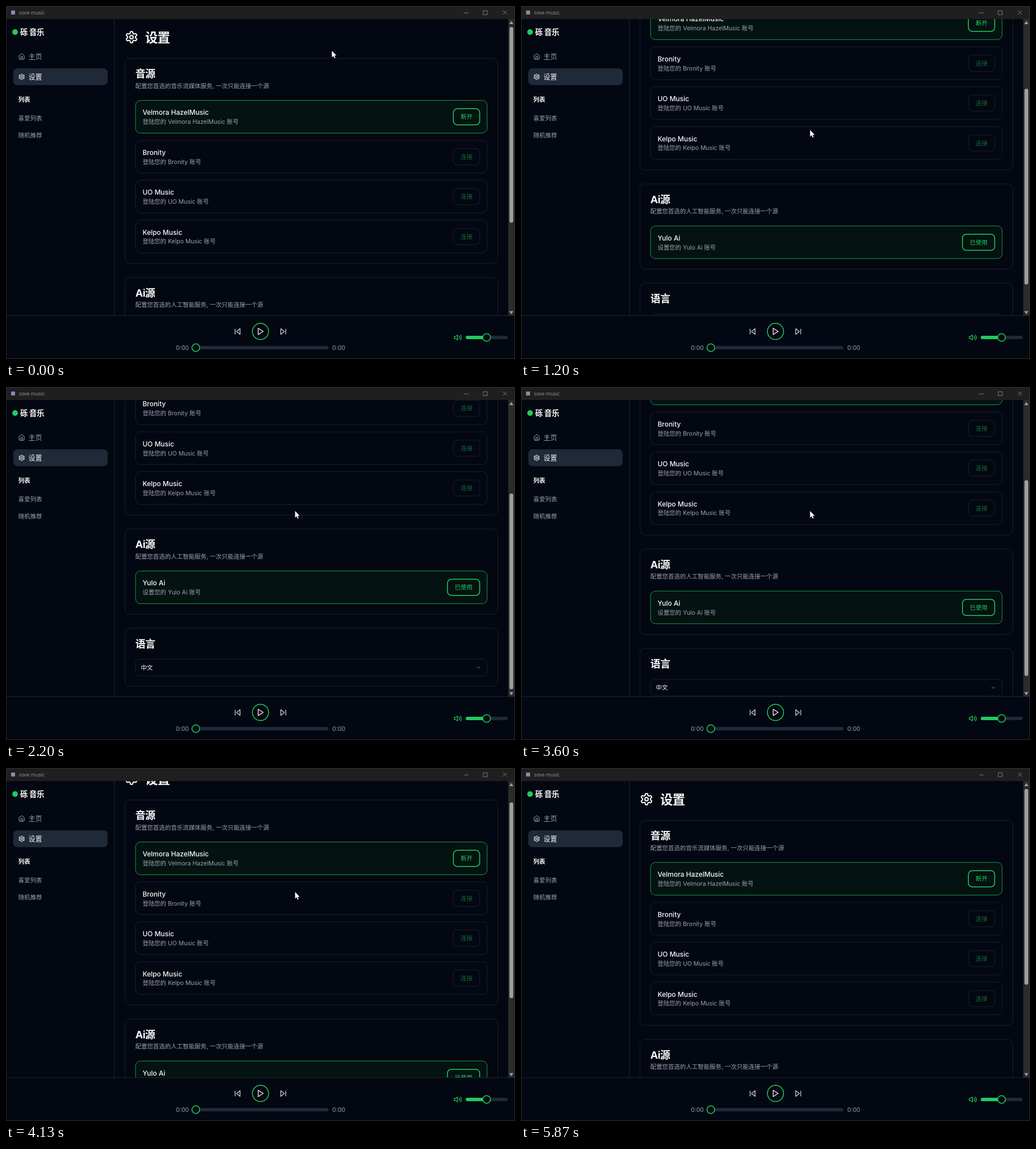
Recreate the animation shown at these times as an HTML page. Size 899 px wide and 623 px high, loop 7.87 s.

```html
<!DOCTYPE html>
<html lang="zh-CN">
<head>
<meta charset="utf-8">
<title>sove music</title>
<style>
  html, body { margin: 0; width: 100%; height: 100%; overflow: hidden; background: #030711; }
  svg { display: block; width: 100%; height: 100%; }
  text { font-family: Inter, "Noto Sans CJK SC", "Noto Sans CJK", sans-serif; white-space: pre; }
  .bar { font-family: "Open Sans", "Noto Sans", sans-serif; }
  .tight { letter-spacing: -0.025em; }
</style>
</head>
<body>
<svg id="stage" viewBox="0 0 899 623"></svg>
<script>
const LOOP = 7870;
const ZOOM = 0.749; // the page is laid out in its own units and shown at this scale
const MAX_SCROLL = 228.4;
const BG = '#030711', LINE = '#1f2937', MUTED = '#9ca3af', WHITE = '#f9fafb', GREEN = '#1fcb5d';

// Markup helpers
const text = (x, y, s, size, fill, weight = 400, extra = '') =>
  `<text x="${x}" y="${y}" font-size="${size}" fill="${fill}" font-weight="${weight}" ${extra}>${s}</text>`;
const box = (x, y, w, h, rx, fill, stroke = 'none', sw = 1) =>
  `<rect x="${x}" y="${y}" width="${w}" height="${h}" rx="${rx}" fill="${fill}" stroke="${stroke}" stroke-width="${sw}"/>`;
// A box whose border lies inside its outer size
const frame = (x, y, w, h, r, fill, stroke, sw = 1) =>
  box(x + sw / 2, y + sw / 2, w - sw, h - sw, r - sw / 2, fill, stroke, sw);
const path = (d, stroke, sw = 1, fill = 'none') =>
  `<path d="${d}" stroke="${stroke}" stroke-width="${sw}" fill="${fill}"/>`;
const ring = (x, y, r) =>
  `<circle cx="${x}" cy="${y}" r="${r}" fill="${BG}" stroke="${GREEN}" stroke-width="1.5"/>`;
const icon = (x, y, scale, color, body) =>
  `<g transform="translate(${x} ${y}) scale(${scale})" fill="none" stroke="${color}" stroke-width="2" stroke-linecap="round" stroke-linejoin="round">${body}</g>`;

// Icons on a 24 x 24 grid
const tooth = 'M8.57 6.03l.21-.12a2 2 0 0 0 1-1.73V4a2 2 0 0 1 2-2h.44a2 2 0 0 1 2 2v.18a2 2 0 0 0 1 1.73l.21.12';
const GEAR = [0, 60, 120, 180, 240, 300]
  .map(a => `<path d="${tooth}" transform="rotate(${a} 12 12)"/>`).join('') + '<circle cx="12" cy="12" r="3"/>';
const HOME = '<path d="M3 9l9-7 9 7v11a2 2 0 0 1-2 2H5a2 2 0 0 1-2-2zM9 22V12h6v10"/>';
const BACK = '<path d="M19 20L9 12l10-8zM5 19V5"/>';
const NEXT = '<path d="M5 4l10 8-10 8zM19 5v14"/>';
const PLAY = '<path d="M5 3l14 9-14 9z"/>';
const SOUND = '<path d="M11 5L6 9H2v6h4l5 4zM15.54 8.46a5 5 0 0 1 0 7.07M19.07 4.93a10 10 0 0 1 0 14.14"/>';

function button(y, label, active) {
  const w = label.length * 14 + 36, x = 1118 - w;
  return `<g opacity="${active ? 1 : 0.5}">` +
    frame(x, y, w, 40, 10, 'none', active ? GREEN : LINE, 2) +
    text(x + w / 2, y + 25.2, label, 14, GREEN, 500, 'text-anchor="middle"') + '</g>';
}

function row(y, name, verb, label, active) {
  return frame(305, y, 830, 78, 12, active ? '#041211' : 'none', active ? GREEN : LINE) +
    text(322, y + 34.8, name, 16, WHITE, 500) +
    text(322, y + 56.1, `${verb}您的 ${name} 账号`, 14, MUTED) +
    button(y + 19, label, active);
}

function card(y, h, title, note = '') {
  return frame(280, y, 880, h, 12, 'none', LINE) +
    text(305, y + 45.7, title, 24, WHITE, 700, 'class="tight"') +
    text(305, y + 70.1, note, 14, MUTED);
}

function page() {
  const services = ['Velmora HazelMusic', 'Bronity', 'UO Music', 'Kelpo Music'];
  return icon(280, 57.5, 4 / 3, WHITE, GEAR) +
    text(328, 84.9, '设置', 30, WHITE, 700, 'class="tight"') +
    card(123, 484, '音源', '配置您首选的音乐流媒体服务, 一次只能连接一个源') +
    services.map((s, i) => row(222 + i * 94, s, '登陆', i ? '连接' : '断开', !i)).join('') +
    card(639, 202, 'Ai源', '配置您首选的人工智能服务, 一次只能连接一个源') +
    row(738, 'Yulo Ai', '设置', '已使用', true) +
    card(873, 138, '语言') +
    frame(305, 946, 830, 40, 10, 'none', LINE) +
    text(318, 971.1, '中文', 14, WHITE) +
    path('M1110 964l4 4 4-4', '#858b96', 1.3);
}

function sidebar() {
  return `<circle cx="16" cy="46" r="5" fill="${GREEN}"/>` +
    text(25, 50.8, '砾 音乐', 13.5, WHITE, 700, 'class="tight"') +
    icon(21.7, 83, 0.5, MUTED, HOME) + text(39.8, 93.8, '主页', 12, MUTED) +
    box(12.7, 110, 167, 29.8, 7.5, LINE) +
    icon(21.7, 119, 0.5, WHITE, GEAR) + text(39.8, 129.8, '设置', 12, WHITE, 500) +
    text(21.7, 169.3, '列表', 10.5, WHITE, 700) +
    text(21.7, 202, '喜爱列表', 10.5, MUTED) +
    text(21.7, 232.3, '随机推荐', 10.5, MUTED) +
    path('M191.5 23V546', LINE, 0.9);
}

function player() {
  return path('M0 546.5H899', LINE, 0.9) +
    icon(401.5, 567, 0.625, '#d1d5db', BACK) +
    ring(449.5, 574.3, 14.3) +
    icon(442.3, 566.8, 0.625, WHITE, PLAY) +
    icon(482.2, 567, 0.625, '#d1d5db', NEXT) +
    text(300, 606.8, '0:00', 10.5, MUTED) +
    box(335, 600, 234.5, 6, 3, LINE) + ring(335.2, 603, 6.8) +
    text(576.3, 606.8, '0:00', 10.5, MUTED) +
    icon(790.5, 577.5, 0.625, GREEN, SOUND) +
    box(812, 582, 74, 6, 3, LINE) + box(812, 582, 37, 6, 3, GREEN) + ring(848.8, 585, 6.8);
}

function titleBar() {
  return box(0, 0, 899, 23, 0, '#1f1f1f') +
    box(9, 8, 7, 7, 0, '#9b7fb5') +
    text(23, 15, 'sove music', 8.8, '#999', 400, 'class="bar"') +
    path('M809 12.2h8M843 8.3h7v7h-7zM877.5 8l7 7M884.5 8l-7 7', '#9a9a9a', 0.75);
}

function scrollbar() {
  return box(887, 23, 12, 523, 0, '#2b2b2b') +
    path('M892.5 26.5l3.6 5.5h-7.2zM892.5 544l3.6-5.5h-7.2z', 'none', 0, '#a0a0a0') +
    `<rect id="thumb" x="889.3" width="6.6" height="345.5" rx="3.3" fill="#9f9f9f"/>`;
}

document.getElementById('stage').innerHTML =
  '<clipPath id="view"><rect x="192" y="23" width="695" height="523"/></clipPath>' +
  box(0, 0, 899, 623, 0, BG) +
  `<g clip-path="url(#view)"><g id="page">${page()}</g></g>` +
  sidebar() + scrollbar() + player() + titleBar() +
  box(0.5, 0.5, 898, 622, 0, 'none', '#303030') +
  '<path id="cursor" d="M0 0V15.8L3.5 12.4 6.1 17.8 8.4 16.8 5.9 11.5H10.8Z" fill="#fff" stroke="#000" stroke-width="1.4" paint-order="stroke"/>';

// Held positions: [start ms, value...]
const scrolls = [
  [0, 0], [1070, 36], [1130, 112], [1200, 165], [1270, 183], [1330, 190], [1400, 192],
  [2130, 213], [2200, MAX_SCROLL],
  [3600, 193], [3670, 148], [3730, 104], [3800, 66], [3870, 47], [3930, 42], [4000, 39], [4070, 37], [4130, 36],
  [4800, 10], [4870, 0]
];
const pointer = [
  [0, 575.6, 79], [70, 569, 95], [130, 545, 148], [200, 520, 199], [270, 511.3, 218.8], [930, 510.6, 218.8],
  [5670, 478, 257], [5730, 350, 412], [5800, 184, 600], [5870, -50, 700]
];
const held = (keys, t) => keys.findLast(k => k[0] <= t);

const pageEl = document.getElementById('page');
const thumb = document.getElementById('thumb');
const cursor = document.getElementById('cursor');

function draw(t) {
  const [, y] = held(scrolls, t);
  const [, cx, cy] = held(pointer, t);
  pageEl.setAttribute('transform', `translate(0 ${-y}) scale(${ZOOM})`);
  thumb.setAttribute('y', 37 + y * 151 / MAX_SCROLL);
  cursor.setAttribute('transform', `translate(${cx} ${cy}) scale(${ZOOM})`);
}

const start = performance.now();
function tick() {
  draw((performance.now() - start) % LOOP);
  requestAnimationFrame(tick);
}
tick();
</script>
</body>
</html>
```
